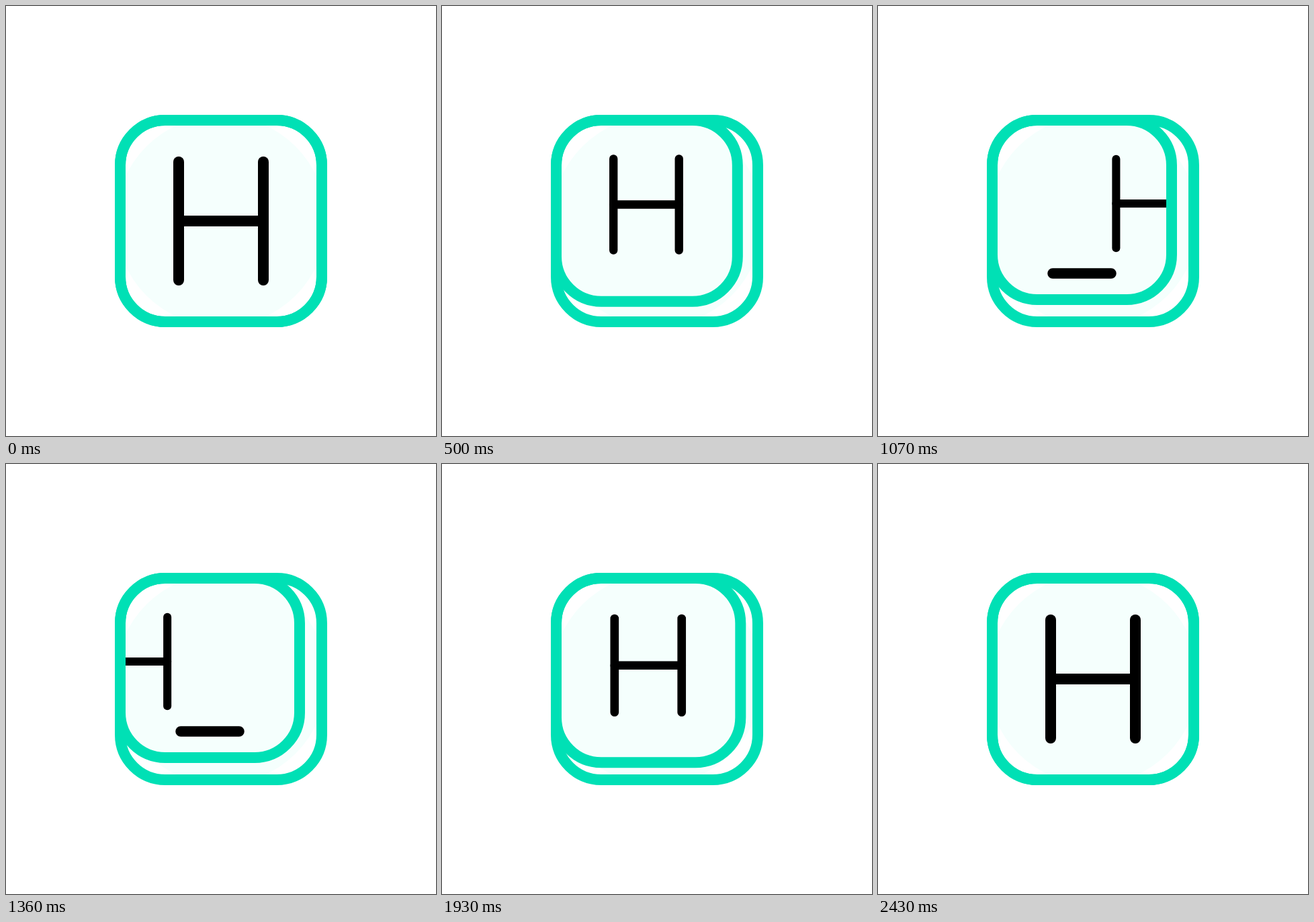
Animation, 640 px wide and 640 px high, one loop 2.78 s. Source, as an HTML page with a canvas:

```html
<!DOCTYPE html>
<html lang="en">
<head>
<meta charset="utf-8">
<style>
  html, body { margin: 0; width: 100%; height: 100%; overflow: hidden; background: #fff; }
  canvas { display: block; width: 100vmin; height: 100vmin; }
</style>
</head>
<body>
<canvas width="640" height="640"></canvas>
<script>
const ctx = document.querySelector('canvas').getContext('2d');
const LOOP = 2780, STEP = 1000 / 14, LAST_STEP = 34;
const GREEN = '#00e0b5', TINT = '#f5fffd';

const span = (t, from, to) => Math.min(1, Math.max(0, (t - from) / (to - from)));
const mix = (a, b, k) => a + (b - a) * k;
const settle = u => u + u * u - u * u * u;
const smooth = u => u * u * (3 - 2 * u);
const lead = m => m + 0.35 * m * (1 - m);

function line(x1, y1, x2, y2) {
  ctx.beginPath();
  ctx.moveTo(x1, y1);
  ctx.lineTo(x2, y2);
  ctx.stroke();
}

function keyPath(size, inset = 0) {
  ctx.beginPath();
  ctx.roundRect(170 + inset, 170 + inset, size - 2 * inset, size - 2 * inset, 67 - inset);
}

function drawKey(size) {
  keyPath(size);
  ctx.lineWidth = 16;
  ctx.strokeStyle = GREEN;
  ctx.stroke();
}

function drawLetter(x, y, scale) {
  const w = 63 * scale, h = 88 * scale;
  ctx.lineWidth = 16 * scale;
  line(x - w, y - h, x - w, y + h);
  line(x + w, y - h, x + w, y + h);
  line(x - w, y, x + w, y);
}

// The letter leaves on the right and comes back from the left.
function slide(t) {
  return t < 1215 ? 190 * span(t, 700, 1215) ** 2
                  : -190 * (1 - span(t, 1215, 1812)) ** 2;
}

function draw(t) {
  const pressing = t < 1500;
  const press = pressing ? settle(span(t, 0, 640)) : 1 - settle(span(t, 1810, 2428));
  const shift = pressing ? lead(press) : press;
  const shrink = pressing ? press : lead(press);
  const size = 300 - 33 * press;

  ctx.clearRect(0, 0, 640, 640);
  ctx.fillStyle = TINT;
  ctx.beginPath();
  ctx.arc(320, 320, 157, 0, 7);
  ctx.fill();
  drawKey(300);

  ctx.save();
  keyPath(size, 7);
  ctx.clip();
  ctx.lineCap = 'round';
  ctx.strokeStyle = '#000';
  drawLetter(mix(320, 303, shift) + slide(t), mix(320, 294, shift), mix(1, 0.753, shrink));

  const start = smooth(span(t, 1545, 1815)), end = smooth(span(t, 520, 780));
  if (end > start) {
    ctx.lineWidth = 15.5;
    line(mix(260, 347, start), 398, mix(260, 347, end), 398);
  }
  ctx.restore();
  drawKey(size);
}

function tick() {
  const n = Math.floor((performance.now() % LOOP + 5) / STEP);
  draw(Math.min(n, LAST_STEP) * STEP);
  requestAnimationFrame(tick);
}
tick();
</script>
</body>
</html>
```
